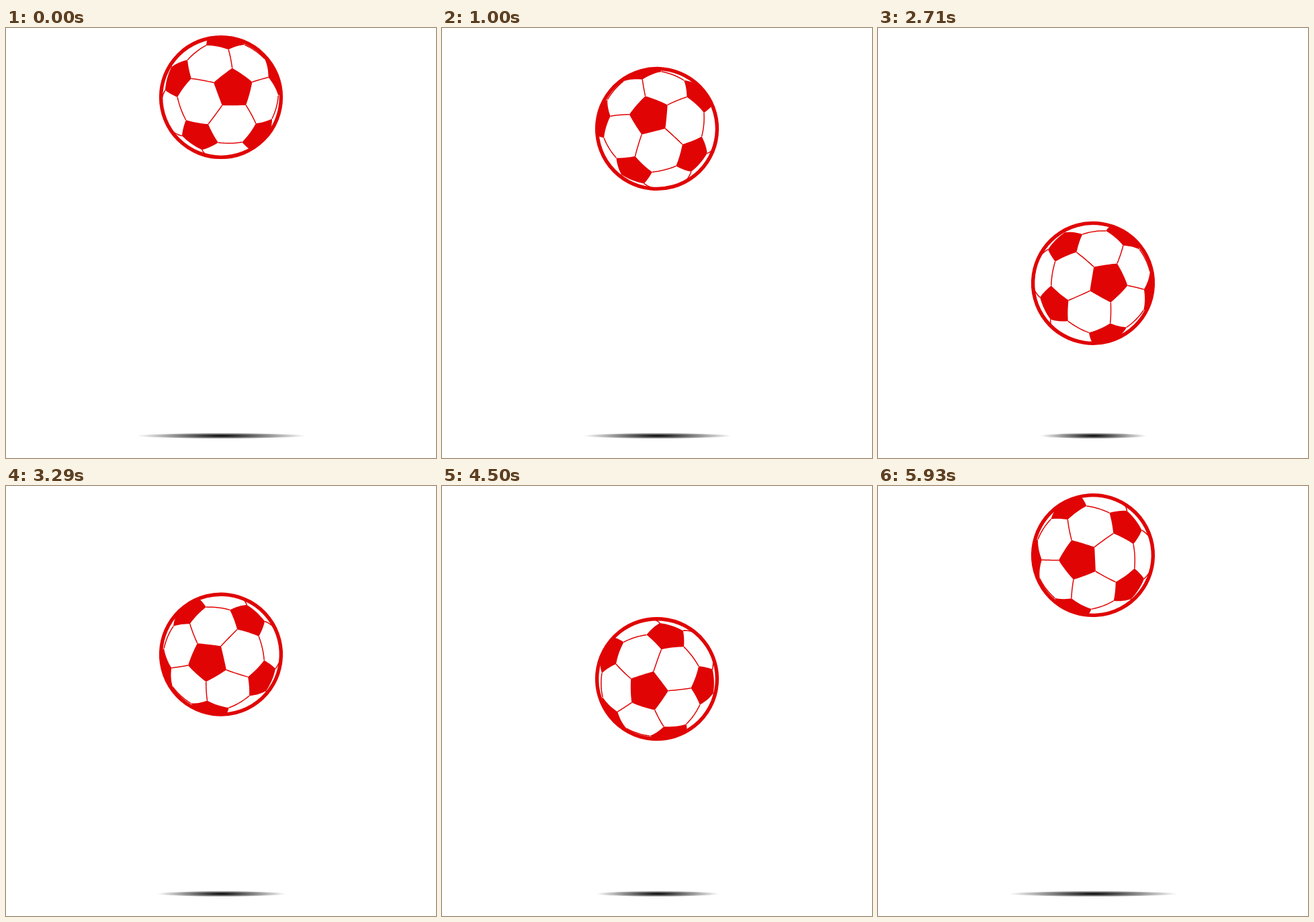
Animation, 640 px wide and 640 px high, one loop 6000 ms. Source, as an HTML page with a canvas:

```html
<!DOCTYPE html>
<html lang="en">
<head>
<meta charset="utf-8">
<title>Bouncing ball</title>
<style>
html, body { margin: 0; width: 100%; height: 100%; overflow: hidden; background: #fff; }
canvas { display: block; width: 640px; height: 640px; }
</style>
</head>
<body>
<canvas id="stage" width="640" height="640"></canvas>
<script>
const ctx = document.getElementById('stage').getContext('2d');
const RED = '#e00404', TAU = 2 * Math.PI, DEG = Math.PI / 180;
const LOOP = 6000, FPS = 14;
const TOP = 103, DROP = 362, SPIN = 19.73 * DEG;
const PEAKS = [0, 15.78, 31.75, 50, 67.4, 83]; // steps at which the ball is highest
const RADIUS = 90;

const dot = (a, b) => a[0] * b[0] + a[1] * b[1] + a[2] * b[2];
const cross = (a, b) => [
  a[1] * b[2] - a[2] * b[1], a[2] * b[0] - a[0] * b[2], a[0] * b[1] - a[1] * b[0]];
const mix = (a, b, t) => a.map((v, i) => v + (b[i] - v) * t);

// Icosahedron directions: a tilted pole, five around it, and their opposites
function makeCentres(tilt, heading, twist) {
  const s = Math.sin(tilt), c = Math.cos(tilt);
  const hx = Math.cos(heading), hy = Math.sin(heading);
  const pole = [s * hx, s * hy, c];
  const u = [c * hx, c * hy, -s], v = [-hy, hx, 0];
  const list = [pole];
  for (let k = 0; k < 5; k++) {
    const a = twist + k * TAU / 5;
    list.push(pole.map((p, i) =>
      (p + 2 * (u[i] * Math.cos(a) + v[i] * Math.sin(a))) / Math.sqrt(5)));
  }
  return list.concat(list.map(p => p.map(x => -x)));
}

const centres = makeCentres(15.2 * DEG, -35 * DEG, 15.2 * DEG);

// Neighbours of a centre, in order around it
function around(c) {
  const near = centres.filter(p => Math.abs(dot(p, c) - 1 / Math.sqrt(5)) < 0.01);
  const u = near[0], w = cross(c, u);
  const turn = p => Math.atan2(dot(p, w), dot(p, u));
  return near.sort((a, b) => turn(a) - turn(b));
}

// Flat position on the ball; hidden points slide to the rim
function project(p) {
  const k = RADIUS / (p[2] < 0 ? Math.hypot(p[0], p[1]) : Math.hypot(...p));
  return [p[0] * k, p[1] * k];
}

function trace(path, a, b) {
  for (let i = 0; i <= 8; i++) path.lineTo(...project(mix(a, b, i / 8)));
}

const patches = new Path2D(), seams = new Path2D();
for (const c of centres) {
  if (c[2] < 0) continue;
  const near = around(c);
  const corners = near.map(n => mix(c, n, 1 / 3));
  patches.moveTo(...project(corners[0]));
  corners.forEach((p, i) => trace(patches, p, corners[(i + 1) % 5]));
  patches.closePath();
  near.forEach((n, i) => {
    seams.moveTo(...project(corners[i]));
    trace(seams, corners[i], mix(c, n, 2 / 3));
  });
}

function drawBall(y, angle) {
  ctx.save();
  ctx.translate(320, y);
  ctx.rotate(angle);
  ctx.fillStyle = ctx.strokeStyle = RED;
  ctx.fill(patches);
  ctx.lineWidth = 1.5;
  ctx.stroke(seams);
  ctx.lineWidth = 5.4;
  ctx.beginPath();
  ctx.arc(0, 0, 89.4, 0, TAU);
  ctx.stroke();
  ctx.restore();
}

function drawShadow(w) {
  ctx.save();
  ctx.translate(320.7, 607);
  ctx.beginPath();
  ctx.ellipse(0, 0, w, 3.7, 0, 0, TAU);
  ctx.clip();
  ctx.scale(w, 6);
  const g = ctx.createRadialGradient(0, 0, 0, 0, 0, 1);
  g.addColorStop(0, '#000');
  g.addColorStop(1, '#fff');
  ctx.fillStyle = g;
  ctx.fillRect(-1, -1, 2, 2);
  ctx.restore();
}

// 0 at the highest point, 1 at the lowest
function fall(n) {
  const i = Math.max(1, PEAKS.findIndex(p => p >= n));
  const u = (n - PEAKS[i - 1]) / (PEAKS[i] - PEAKS[i - 1]);
  return 1 - Math.abs(1 - 2 * u);
}

function draw(ms) {
  const n = Math.floor((ms % LOOP + 5) * FPS / 1000) % 84;
  const t = fall(n);
  ctx.fillStyle = '#fff';
  ctx.fillRect(0, 0, 640, 640);
  drawShadow(126 - 68 * t);
  drawBall(TOP + DROP * t * t * (3 - 2 * t), n * SPIN);
}

const start = performance.now();
function tick() {
  draw(performance.now() - start);
  requestAnimationFrame(tick);
}
tick();
</script>
</body>
</html>
```
